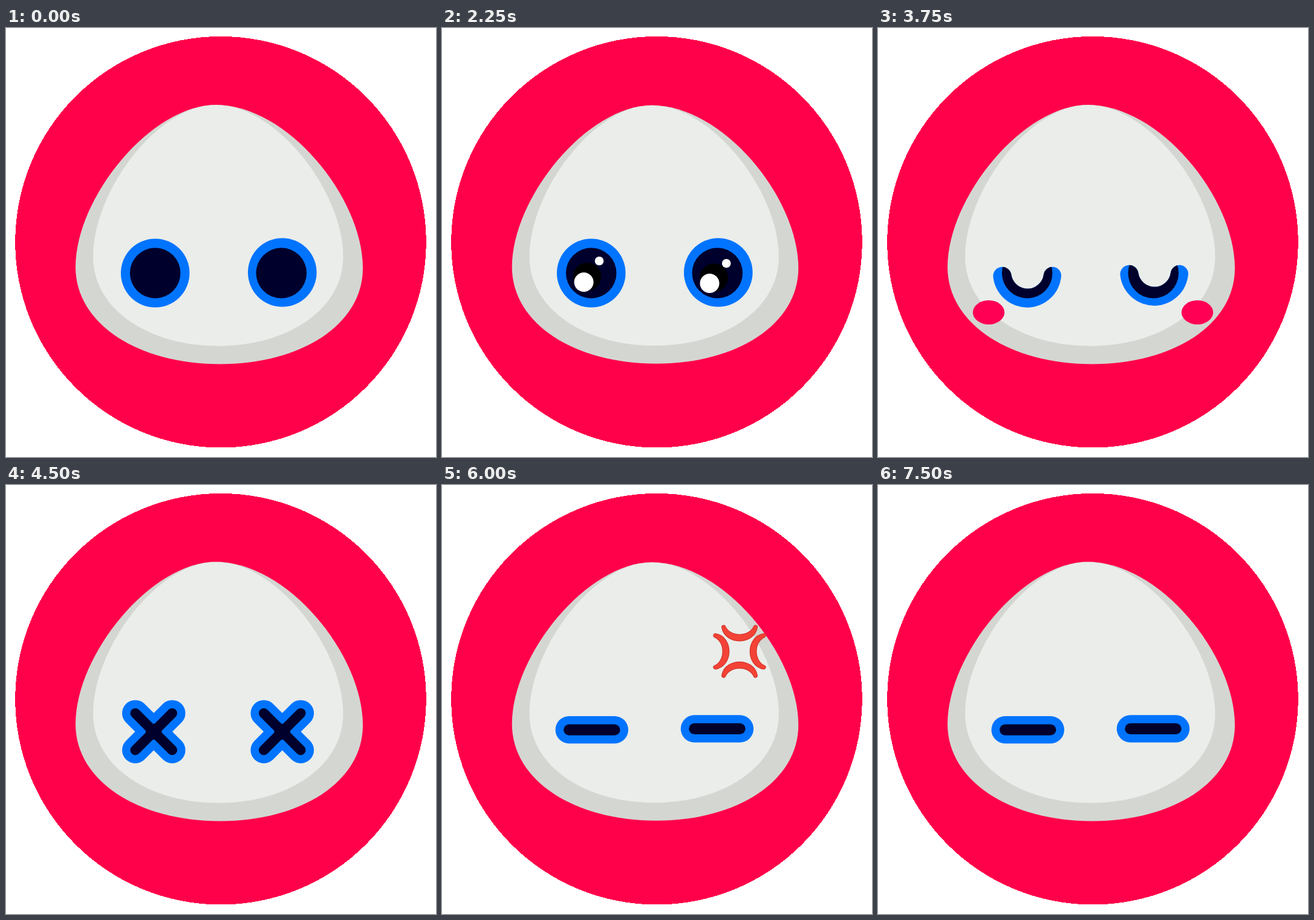
Recreate the animation shown at these times as an HTML page. Size 711 by 709 pixels, loop 8000 ms.

```html
<!DOCTYPE html>
<html lang="en">
<head>
<meta charset="utf-8">
<title>Egg moods</title>
<style>
  html, body { margin: 0; width: 100%; height: 100%; overflow: hidden; background: #fff; }
  svg { display: block; width: 100%; height: 100%; }
  .scene {
    opacity: 0;
    animation: show 8s step-end infinite;
    animation-delay: calc(var(--i) * .75s - 8s);
  }
  .last { animation-name: show-short; }
  @keyframes show { 0% { opacity: 1 } 9.375%, 100% { opacity: 0 } }
  @keyframes show-short { 0% { opacity: 1 } 6.25%, 100% { opacity: 0 } }
  .blue { fill: #0074ff; }
  .dark { fill: #00002d; }
  .cheek { fill: #ff0055; }
  .cross { fill: none; stroke-linecap: round; }
</style>
</head>
<body>
<svg viewBox="0 0 711 709">
  <defs>
    <path id="shell" d="M347 127C240 127 115 280 115 395C115 490 220 555.5 354 555.5C488 555.5 590 490 590 397C590 280 465 127 347 127Z"/>
    <path id="front" d="M347 127C250 127 144 270 144 378C144 465 236 525.5 351 525.5C466 525.5 557.5 465 557.5 378C557.5 270 447 127 347 127Z"/>
    <clipPath id="in-shell"><use href="#shell"/></clipPath>
    <clipPath id="tip"><rect x="200" y="120" width="300" height="62"/></clipPath>
    <clipPath id="in-pupils">
      <circle cx="246.7" cy="405" r="41.8"/>
      <circle cx="455.3" cy="405" r="41.8"/>
    </clipPath>

    <g id="face">
      <use href="#shell" fill="#d4d6d2"/>
      <use href="#front" fill="#eaedea"/>
    </g>
    <use id="small-face" href="#face" transform="translate(352.5 341.5) scale(.997) translate(-352.5 -341.5)"/>

    <g id="round-eyes">
      <g class="blue">
        <circle cx="246.7" cy="405" r="56.8"/>
        <circle cx="456.8" cy="404" r="56.8"/>
      </g>
      <g class="dark">
        <circle cx="246.7" cy="405" r="41.8"/>
        <circle cx="455.3" cy="405" r="41.8"/>
      </g>
    </g>

    <g id="shiny-eyes">
      <use href="#round-eyes"/>
      <circle cx="240" cy="411" r="23.3"/>
      <circle cx="449.7" cy="412.5" r="23.3"/>
      <g fill="#fff">
        <circle cx="234.5" cy="420" r="16"/>
        <circle cx="260" cy="385" r="7.3"/>
        <circle cx="442.5" cy="422" r="16"/>
        <circle cx="470.2" cy="389" r="7.3"/>
      </g>
    </g>

    <g id="arches">
      <path id="arch" d="M190.1 405A56.7 56.7 0 0 1 303.4 402A15.3 15.3 0 0 1 273 407A26.6 26.6 0 0 0 219.5 408A15 15 0 0 1 190.1 405Z"/>
      <use href="#arch" x="210" y="-1.5"/>
    </g>
    <g id="happy-eyes">
      <use href="#arches" class="blue"/>
      <g clip-path="url(#in-pupils)"><use href="#arches" class="dark"/></g>
    </g>

    <g id="bowls">
      <path id="bowl" d="M190.5 412A15 15 0 0 1 220.5 408A27 27 0 0 0 274 407A14.6 14.6 0 0 1 303 409A56.5 56.5 0 0 1 190.5 412Z"/>
      <use href="#bowl" x="210" y="-3"/>
    </g>
    <g id="sad-eyes">
      <use href="#bowls" class="blue"/>
      <g clip-path="url(#in-pupils)"><use href="#bowls" class="dark"/></g>
    </g>

    <g id="cross-eyes">
      <g id="cross-eye" class="cross">
        <path d="M213.8 377.2l61 61m0-61l-61 61" stroke="#0074ff" stroke-width="43.6"/>
        <path d="M213.8 377.2l61 61m0-61l-61 61" stroke="#00002d" stroke-width="16.6"/>
        <circle class="dark" cx="244.3" cy="407.7" r="13.3"/>
      </g>
      <use href="#cross-eye" x="212.5"/>
    </g>

    <g id="flat-eyes">
      <g id="flat-eye">
        <rect class="blue" x="187.5" y="382" width="120.5" height="45.2" rx="22.6"/>
        <rect class="dark" x="201" y="395.5" width="93.5" height="18.2" rx="9.1"/>
      </g>
      <use href="#flat-eye" x="207.2" y="-1.7"/>
    </g>

    <g id="cheeks" class="cheek">
      <ellipse cx="190.6" cy="447.2" rx="26.2" ry="19.9"/>
      <ellipse cx="518.6" cy="447.2" rx="26.2" ry="19.9"/>
    </g>
    <g id="low-cheeks" class="cheek">
      <ellipse cx="183" cy="470" rx="26.2" ry="19.9"/>
      <ellipse cx="528" cy="470" rx="26.2" ry="19.9"/>
    </g>

    <g id="halo">
      <path fill="#ff0" fill-rule="evenodd" d="M134 198a218 46 0 0 1 436 0a218 46 0 0 1-436 0zM167 195a178.7 35.5 0 0 0 357.4 0a178.7 35.5 0 0 0-357.4 0z"/>
      <path fill="#ffbf00" fill-rule="evenodd" d="M134 203.5a218 50.5 0 0 1 436 0a218 50.5 0 0 1-436 0zM167 200a178.7 41.8 0 0 0 357.4 0a178.7 41.8 0 0 0-357.4 0z"/>
      <g clip-path="url(#tip)"><use href="#front" fill="#eaedea"/></g>
    </g>

    <g id="tears" clip-path="url(#in-shell)">
      <path fill="#00b4ff" d="M213.5 442h65.5v120h-65.5zM426.5 442h65.5v120h-65.5z"/>
      <rect fill="#00e4ff" x="219.5" y="430" width="27.3" height="89.3" rx="13.6"/>
      <rect fill="#00e4ff" x="427.5" y="430" width="27.3" height="95.8" rx="13.6"/>
    </g>

    <g id="anger" transform="translate(492 275)" fill="#f44336" stroke="#d93a2f" stroke-width="1.5">
      <path id="vein" d="M-29.2-39.5C-24-10 24-10 29.2-39.5A3 3 0 0 0 24-42C16-23-16-23-24-42A3 3 0 0 0-29.2-39.5Z"/>
      <use href="#vein" transform="rotate(90)"/>
      <use href="#vein" transform="rotate(180)"/>
      <use href="#vein" transform="rotate(270)"/>
    </g>
  </defs>

  <circle cx="355" cy="353.7" r="339.8" fill="#ff004a" shape-rendering="crispEdges"/>

  <g class="scene" style="--i:0"><use href="#face"/><use href="#round-eyes"/></g>
  <g class="scene" style="--i:1"><use href="#face"/><use href="#shiny-eyes"/></g>
  <g class="scene" style="--i:2"><use href="#face"/><use href="#shiny-eyes"/><use href="#halo"/></g>
  <g class="scene" style="--i:3"><use href="#small-face"/><use href="#shiny-eyes"/></g>
  <g class="scene" style="--i:4"><use href="#face"/><use href="#happy-eyes"/><use href="#cheeks"/></g>
  <g class="scene" style="--i:5"><use href="#face"/><use href="#sad-eyes"/><use href="#low-cheeks"/></g>
  <g class="scene" style="--i:6"><use href="#face"/><use href="#cross-eyes"/></g>
  <g class="scene" style="--i:7"><use href="#face"/><use href="#tears"/><use href="#sad-eyes"/></g>
  <g class="scene" style="--i:8"><use href="#small-face"/><use href="#flat-eyes"/><use href="#anger"/></g>
  <g class="scene" style="--i:9"><use href="#face"/><use href="#shiny-eyes"/><use href="#low-cheeks"/></g>
  <g class="scene last" style="--i:10"><use href="#face"/><use href="#flat-eyes"/></g>
</svg>
</body>
</html>
```
